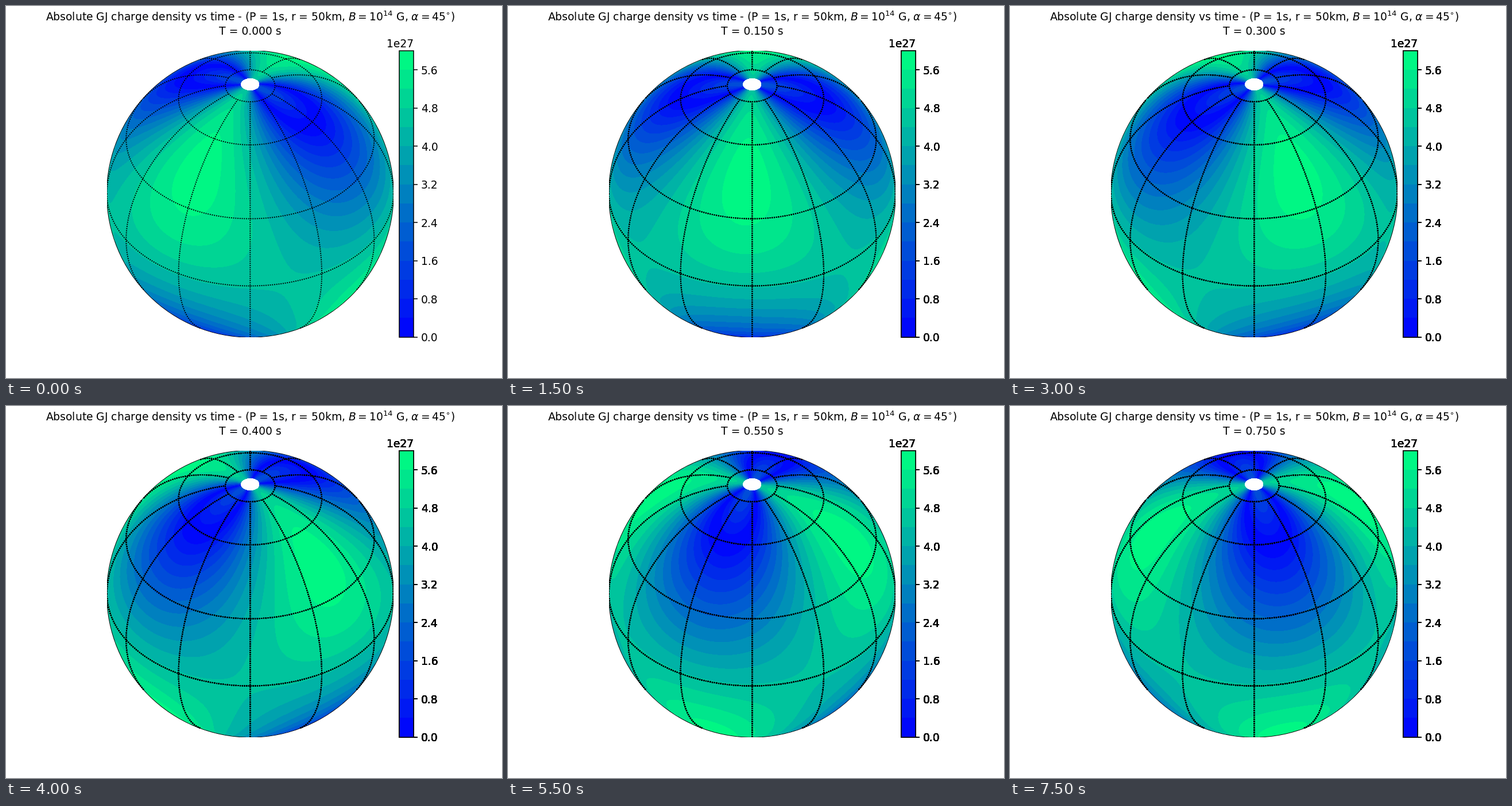
A matplotlib script that plays this animation: 864 by 648 pixels, repeating every 8000 ms.

```python
import numpy as np
import matplotlib.pyplot as plt
from matplotlib.animation import FuncAnimation
from matplotlib.patches import Circle, Polygon

FRAMES, INTERVAL = 16, 500
W, H, DPI = 864, 648, 135
LAT0, LON0 = np.radians(40), np.radians(30)
ALPHA = np.radians(45)
LEVELS = np.arange(16) * 0.4e27
TITLE = ("Absolute GJ charge density vs time - (P = 1s, r = 50km, "
         r"$B = 10^{14}$ G, $\alpha = 45^{\circ}$)" "\nT = %.3f s")


def project(lat, lon):
    """Orthographic projection of degrees onto the unit disc; far side is NaN."""
    lat, lon = np.broadcast_arrays(np.radians(lat), np.radians(lon) - LON0)
    x = np.cos(lat) * np.sin(lon)
    y = np.sin(lat) * np.cos(LAT0) - np.cos(lat) * np.cos(lon) * np.sin(LAT0)
    z = np.sin(lat) * np.sin(LAT0) + np.cos(lat) * np.cos(lon) * np.cos(LAT0)
    return np.where(z >= 0, x, np.nan), np.where(z >= 0, y, np.nan)


def unproject(x, y):
    """Latitude and longitude in radians; points off the disc go to the limb."""
    r = np.maximum(np.hypot(x, y), 1)
    x, y = x / r, y / r
    z = np.sqrt(np.clip(1 - x**2 - y**2, 0, 1))
    lat = np.arcsin(np.clip(y * np.cos(LAT0) + z * np.sin(LAT0), -1, 1))
    lon = np.arctan2(x, z * np.cos(LAT0) - y * np.sin(LAT0)) + LON0
    return lat, lon


grid = np.linspace(-1, 1, 501)
lat, lon = unproject(*np.meshgrid(grid, grid))
theta = lat / 2


def density(t):
    psi = 2 * lon - 2 * np.pi * t
    axial = np.cos(ALPHA) * (3 * np.cos(theta)**2 - 1)
    tilted = 3 * np.sin(ALPHA) * np.sin(theta) * np.cos(theta) * np.cos(psi)
    return np.pi * 1e27 * np.abs(axial + tilted)


fig = plt.figure(figsize=(W / DPI, H / DPI), dpi=DPI, facecolor="white")

# Map plus colour bar (2% gap, 5% width), centred in the default subplot area
size = 0.77 * H
left = 0.5125 * W - 1.07 * size / 2
ax = fig.add_axes([left / W, 0.11, size / W, 0.77])
ax.set(xlim=(-1, 1), ylim=(-1, 1))
ax.set_axis_off()
title = ax.set_title(TITLE % 0, fontsize=10, pad=15)

limb = ax.add_patch(Circle((0, 0), 1, fc="none", ec="black", lw=1, zorder=0))
ring = np.column_stack(project(86.4, np.arange(0, 360, 3.6)))
ax.add_patch(Polygon(ring, fc="white", ec="none", aa=False, zorder=1.5))


def draw_field(t):
    cs = ax.contourf(grid, grid, density(t), LEVELS, cmap="winter")
    cs.set_clip_path(limb)
    return cs


def draw_graticule():
    lons = np.linspace(-180, 180, 3001)
    lats = np.linspace(-80, 80, 3001)
    curves = [project(p, lons) for p in (0, 30, 60, 80)]
    curves += [project(lats, m) for m in range(0, 360, 30)]
    return [ax.plot(x, y, color="black", lw=1, dashes=[1, 1], zorder=2)[0]
            for x, y in curves]


key = draw_field(0)
key.set_visible(False)


def draw_colorbar():
    cax = fig.add_axes([(left + 1.02 * size) / W, 0.11, 0.05 * size / W, 0.77])
    fig.colorbar(key, cax=cax)
    return cax


# Overlays pile up: each step adds one more copy of graticule and colour bar
layers = [draw_graticule() + [draw_colorbar()] for _ in range(FRAMES)]
shown = []


def update(i):
    while shown:
        shown.pop().remove()
    t = i * 0.05
    shown.append(draw_field(t))
    title.set_text(TITLE % t)
    for k, layer in enumerate(layers):
        for artist in layer:
            artist.set_visible(k <= i)
    return []


anim = FuncAnimation(fig, update, frames=FRAMES, interval=INTERVAL,
                     repeat=True, repeat_delay=0, blit=False)
plt.show()
```
